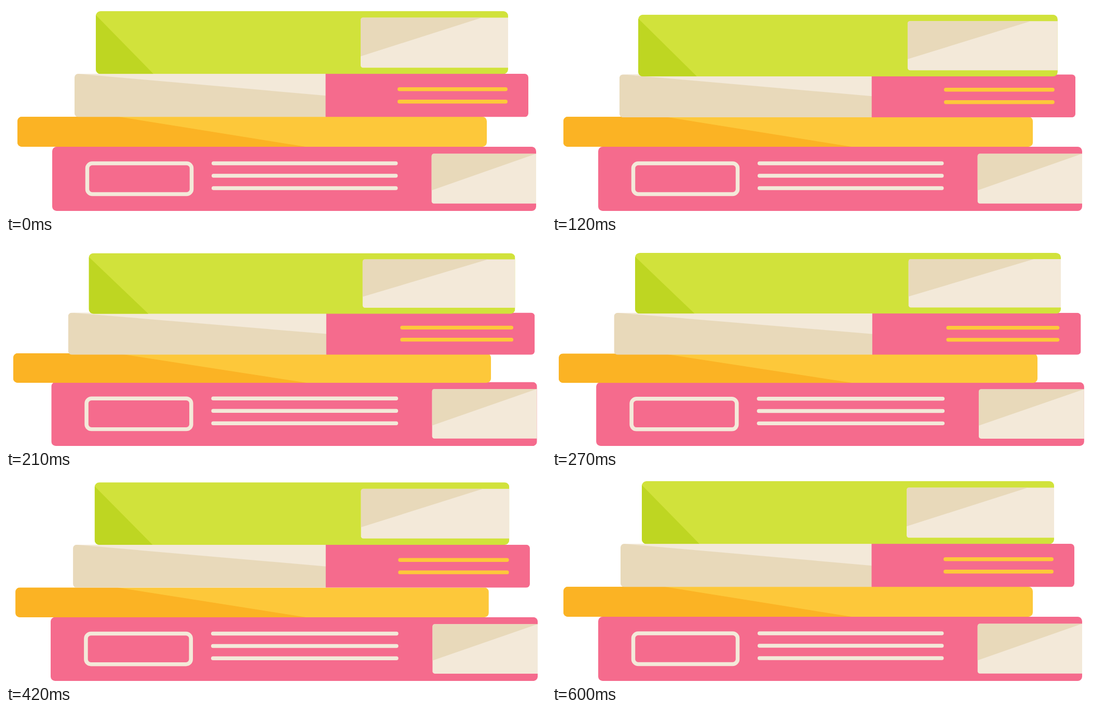
Recreate the animation shown at these times as an HTML page. Size 1040 px wide and 400 px high, loop 1170 ms.

```html
<!DOCTYPE html>
<html lang="en">
<head>
<meta charset="utf-8">
<title>Stack of books</title>
<style>
  html, body { margin: 0; width: 100%; height: 100%; overflow: hidden; background: #fff; }
  svg { display: block; width: 100%; height: 100%; }
  .pink { fill: #f56b8d; }
  .cream { fill: #f3e9d9; }
  .tan { fill: #e8d9ba; }
  .line { fill: none; stroke-width: 7.5; stroke-linecap: round; }
</style>
</head>
<body>
<svg viewBox="0 0 1040 400">
  <defs>
    <clipPath id="c1"><rect x="89" y="272" width="932" height="124" rx="8.5"/></clipPath>
    <clipPath id="c2"><rect x="22" y="214" width="904" height="58" rx="8.5"/></clipPath>
    <clipPath id="c3"><rect x="132" y="131" width="874" height="83.5" rx="7"/></clipPath>
    <clipPath id="c4"><rect x="173" y="10" width="794" height="121.3" rx="9"/></clipPath>
    <clipPath id="p1"><rect x="819.7" y="285.5" width="220" height="96.3" rx="4.5"/></clipPath>
    <clipPath id="p4"><rect x="683" y="22.5" width="320" height="96.7" rx="4.5"/></clipPath>
  </defs>

  <g id="bottom">
    <g clip-path="url(#c1)">
      <path class="pink" d="M89 272H1021V396H89Z"/>
      <g clip-path="url(#p1)">
        <path class="cream" d="M819 285H1021V382H819Z"/>
        <path class="tan" d="M819 285H1022.5L819 356.6Z"/>
      </g>
    </g>
    <rect class="line" x="156.5" y="304" width="201" height="59.5" rx="9.5" stroke="#f3e9d9"/>
    <path class="line" stroke="#f3e9d9" d="M399.7 304H750.7M399.7 328H750.7M399.7 352H750.7"/>
  </g>

  <g id="yellow">
    <g clip-path="url(#c2)">
      <path fill="#fdc83a" d="M22 214H926V272H22Z"/>
      <path fill="#fbb324" d="M22 214H217L577 272H22Z"/>
    </g>
  </g>

  <g id="paper">
    <g clip-path="url(#c3)">
      <path class="tan" d="M132 131H616V214.5H132Z"/>
      <path class="cream" d="M138 131H616V173.2Z"/>
      <path class="pink" d="M615.5 131H1006V214.5H615.5Z"/>
    </g>
    <path class="line" stroke="#fdc83a" d="M757.8 160.7H962.2M757.8 184.7H962.2"/>
  </g>

  <g id="green">
    <g clip-path="url(#c4)">
      <path fill="#d1e23b" d="M173 10H967V131.3H173Z"/>
      <path fill="#bed622" d="M173 17.5L284 131.3H173Z"/>
      <g clip-path="url(#p4)">
        <path class="cream" d="M682 22H967V120H682Z"/>
        <path class="tan" d="M682 22H918L682 97.6Z"/>
      </g>
    </g>
  </g>
</svg>
<script>
const LOOP = 1170, STEP = 30;

// grow: widest spread per side in px; drop: px sunk per px of spread
const books = [
  { id: 'bottom', cx: 555, base: 396, half: 466, from: 135, peak: 315, to: 580, grow: 4.6, drop: 0 },
  { id: 'yellow', cx: 474, base: 272, half: 452, from: 110, peak: 240, to: 565, grow: 9.2, drop: .25 },
  { id: 'paper', cx: 569, base: 214.5, half: 437, from: 80, peak: 235, to: 505, grow: 13.1, drop: .42 },
  { id: 'green', cx: 570, base: 131.3, half: 397, from: 10, peak: 230, to: 490, grow: 13.8, drop: .69 }
];
for (const b of books) b.node = document.getElementById(b.id);

const clamp = u => Math.max(0, Math.min(1, u));
const ease = u => (1 - Math.cos(Math.PI * clamp(u))) / 2;

// Sine rise to the peak, then a slower sine fall
const pulse = (t, { from, peak, to }) =>
  t < peak ? ease((t - from) / (peak - from)) : ease((to - t) / (to - peak));

function draw(ms) {
  const t = Math.floor(ms / STEP) * STEP;
  for (const b of books) {
    const spread = b.grow * pulse(t, b), s = spread / b.half;
    b.node.setAttribute('transform',
      `translate(${b.cx} ${b.base + spread * b.drop}) scale(${1 + s} ${1 - s}) translate(${-b.cx} ${-b.base})`);
  }
}

let start;
function tick(now) {
  if (start === undefined) start = now;
  draw(Math.max(0, now - start) % LOOP);
  requestAnimationFrame(tick);
}
draw(0);
requestAnimationFrame(tick);
</script>
</body>
</html>
```
